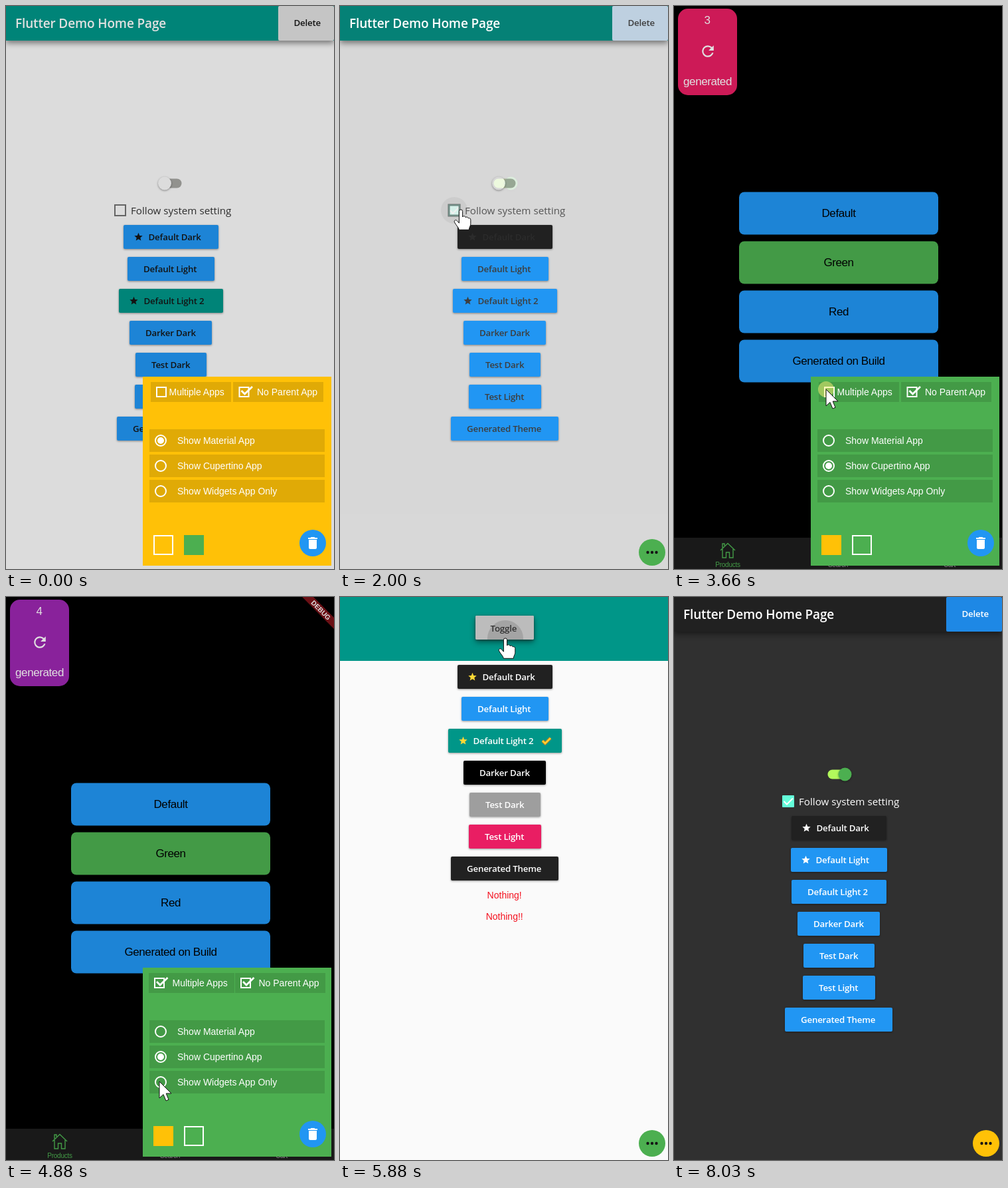
Animation, 494 px wide and 846 px high, one loop 8.89 s. Source, as an HTML page:

```html
<!DOCTYPE html>
<html lang="en">
<head>
<meta charset="utf-8">
<title>Theme demo</title>
<style>
  html, body { margin: 0; width: 100%; height: 100%; overflow: hidden; background: #303030; }
  svg { display: block; width: 494px; height: 846px; }
  text { font-family: "Liberation Sans", Arial, sans-serif; font-size: 14px; white-space: pre; }
  .ui { font-family: "Open Sans", "Noto Sans", sans-serif; font-size: 15.2px; }
  .btn { font-size: 13.3px; font-weight: 600; letter-spacing: -.2px; }
  .title { font-size: 19px; font-weight: 600; letter-spacing: -.14px; }
  .ios { font-size: 17px; letter-spacing: -.41px; }
  .tab { font-size: 10px; letter-spacing: -.24px; }
  .raised { filter: drop-shadow(0 1.5px 1.5px rgba(0,0,0,.4)); }
  .lifted { filter: drop-shadow(0 4px 4px rgba(0,0,0,.45)); }
</style>
</head>
<body>
<svg id="stage" viewBox="0 0 494 846"></svg>
<script>
const LOOP = 8890;
const TEAL = '#009688', BLUE = '#2196f3', GREEN = '#4caf50', INK = '#212121';
const AMBER = [255, 193, 7], LEAF = [76, 175, 80];

// markup helpers
const rect = (x, y, w, h, fill, more = '') =>
  `<rect x="${x}" y="${y}" width="${w}" height="${h}" fill="${fill}" ${more}/>`;
const disc = (x, y, r, fill, more = '') =>
  `<circle cx="${x}" cy="${y}" r="${r}" fill="${fill}" ${more}/>`;
const text = (x, y, s, fill, cls = '', more = '') =>
  `<text x="${x}" y="${y}" fill="${fill}" class="${cls}" ${more}>${s}</text>`;
const mid = (x, y, s, fill, cls) => text(x, y, s, fill, cls, 'text-anchor="middle"');
const line = (d, stroke, w) =>
  `<path d="${d}" fill="none" stroke="${stroke}" stroke-width="${w}"/>`;
const icon = (x, y, scale, d, fill) =>
  `<path transform="translate(${x} ${y}) scale(${scale}) translate(-12 -12)" d="${d}" fill="${fill}"/>`;
const group = (id, body) => `<g id="${id}">${body}</g>`;

const STAR = 'M12 17.27 18.18 21l-1.64-7.03L22 9.24l-7.19-.61L12 2 9.19 8.63 2 9.24l5.46 4.73L5.82 21z';
const TRASH = 'M6 19a2 2 0 0 0 2 2h8a2 2 0 0 0 2-2V7H6zM19 4h-3.5l-1-1h-5l-1 1H5v2h14z';
const REFRESH = 'M17.65 6.35A7.95 7.95 0 0 0 12 4a8 8 0 1 0 7.73 10h-2.08A6 6 0 1 1 12 6c1.66 0 3.14.69 4.22 1.78L13 11h7V4z';

// label, plain button width, own theme colour
const THEMES = [
  ['Default Dark', 129, INK], ['Default Light', 131, BLUE], ['Default Light 2', 143, TEAL],
  ['Darker Dark', 124, '#000'], ['Test Dark', 107, '#9e9e9e'],
  ['Test Light', 109, '#e91e63'], ['Generated Theme', 162, INK]
];

function themeButton(i, y, fill, ink, starred, ticked, gold) {
  const [label, base] = THEMES[i];
  const w = base + (starred ? 14 : 0) + (ticked ? 14 : 0);
  const x = Math.round(248.3 - w / 2);
  let out = rect(x, y, w, 36, fill, 'rx="2" class="raised"');
  if (starred) out += icon(x + 22.5, y + 18, .62, STAR, gold || ink);
  if (ticked) {
    const tick = `M${x + w - 29} ${y + 18}l4 4 8-8`;
    out += line(tick, '#d98a1c', 4.4) + line(tick, '#fdd835', 2);
  }
  return out + text(x + (starred ? 37.5 : 24), y + 23, label, ink, 'ui btn');
}

function materialPage({ dark, current, stars, pressed }) {
  const ink = dark ? '#fff' : '#161616';
  let out = rect(0, 0, 494, 846, dark ? '#303030' : '#fafafa');
  out += rect(0, 0, 494, 52, dark ? INK : TEAL, 'class="lifted"');
  out += text(14, 33, 'Flutter Demo Home Page', '#fff', 'ui title');
  out += rect(410, 0, 84, 52, dark ? '#1e88e5' : '#e0e0e0', 'rx="2"');
  out += text(433.5, 30, 'Delete', ink, 'ui btn');
  out += rect(231.5, 259.5, 33, 14, dark ? '#b2f95c' : '#a6a6a2', 'rx="7"');
  out += disc(dark ? 257.5 : 239, 266.5, 10, dark ? GREEN : '#fafafa', 'class="raised"');
  if (dark) {
    out += rect(163, 298, 18, 18, '#64ffda', 'rx="1"') + line('M165.5 307l4.5 4.5 9-9', '#fff', 2);
  } else {
    if (pressed) out += disc(172, 307, 20, 'rgba(0,0,0,.05)');
    out += rect(164, 299, 16, 16, 'none', `stroke="#737373" stroke-width="${pressed ? 3 : 2}"`);
  }
  out += text(188, 313, 'Follow system setting', dark ? '#fff' : '#333', 'ui');
  THEMES.forEach((th, i) => {
    const fill = i === current ? th[2] : BLUE;
    out += themeButton(i, 329 + 48 * i, fill, !dark && i === current && !i ? '#000' : ink, stars.includes(i));
  });
  return out;
}

function cupertinoPage(count, card, banner) {
  let out = rect(0, 0, 494, 846, '#000');
  out += rect(6, 4, 89, 130, card, 'rx="15"');
  out += mid(50, 27, count, '#fff', 'ios') + icon(51, 68, 1.1, REFRESH, '#fff');
  out += mid(50.5, 119, 'generated', '#fff', 'ios');
  ['Default', 'Green', 'Red', 'Generated on Build'].forEach((s, i) => {
    out += rect(98, 279.5 + 74 * i, 300, 64, i === 1 ? GREEN : BLUE, 'rx="8"');
    out += mid(248, 317 + 74 * i, s, '#000', 'ios');
  });
  out += rect(0, 799, 494, 47, '#1c1c1c');
  out += line('M70 818l11-10.5 11 10.5M73 816v13h5.5v-8h5v8H89v-13M73 814v-6h3v3', GREEN, 1.4);
  out += mid(81, 843, 'Products', GREEN, 'tab') + mid(247, 843, 'Search', '#999', 'tab') + mid(415, 843, 'Cart', '#999', 'tab');
  if (banner) {
    out += `<g transform="translate(474.3 19.7) rotate(45)">${rect(-40, -6, 80, 12, '#7a1218')}${
      text(0, 3.7, 'DEBUG', '#fff', '', 'text-anchor="middle" style="font-size:10.2px;font-weight:700"')}</g>`;
  }
  return out;
}

function widgetsPage(dark) {
  const current = dark ? 0 : 2;
  let out = rect(0, 0, 494, 846, dark ? '#303030' : '#fafafa');
  out += rect(0, 0, 494, 96, dark ? INK : TEAL);
  out += rect(204, 28, 88, 36, '#e0e0e0', 'rx="2" class="raised"');
  THEMES.forEach((th, i) => {
    out += themeButton(i, 102 + 48 * i, th[2], '#fff', i === 0 || i === 2, i === current, '#fdd835');
  });
  out += mid(247.7, 453, 'Nothing!', '#f4111f') + mid(247.7, 485, 'Nothing!!', '#f4111f');
  return out + text(226.5, 52, 'Toggle', '#333', 'ui btn');
}

function chip(x, w, boxX, textX, label, checked) {
  let out = rect(x, 565, w, 30, 'rgba(0,0,0,.12)');
  out += rect(boxX + 1, 573, 14, 14, 'none', 'stroke="#fff" stroke-width="2"');
  if (checked) out += line(`M${boxX + 4} 578l5 5 11.5-11`, '#fff', 2.8);
  return out + text(textX, 585, label, '#fff');
}

function panelBody() {
  let out = group('oneApp', chip(218, 121, 226, 245.5, 'Multiple Apps') + chip(342, 136, 350.5, 378, 'No Parent App', true));
  out += group('manyApps', chip(215, 129, 223, 250.5, 'Multiple Apps', true) + chip(345, 136, 353, 380.5, 'No Parent App', true));
  ['Material App', 'Cupertino App', 'Widgets App Only'].forEach((s, i) => {
    const y = 653 + 38 * i;
    out += rect(216, y - 17, 264, 34, 'rgba(0,0,0,.12)');
    out += disc(233, y, 8, 'none', 'stroke="#fff" stroke-width="2"');
    out += text(258, y + 5, 'Show ' + s, '#fff');
  });
  out += disc(233, 653, 5, '#fff', 'id="dot"');
  out += rect(222, 795, 30, 30, '#ffc107') + rect(268, 795, 30, 30, GREEN);
  out += rect(223, 796, 28, 28, 'none', 'id="pick" stroke="#fff" stroke-width="2"');
  return out + disc(462, 807, 20, BLUE) + icon(462, 807, 1, TRASH, '#fff');
}

function dialog() {
  return rect(0, 347, 494, 152, GREEN) + mid(247, 395, 'Delete saved data?', '#fff') +
    rect(168, 433, 60, 41, 'rgba(0,0,0,.12)', 'id="yes"') + mid(198, 458, 'Yes', '#fff') +
    rect(266, 433, 60, 41, 'rgba(0,0,0,.12)') + mid(296, 458, 'No', '#fff');
}

const PAGES = {
  light: materialPage({ current: 2, stars: [0, 2] }),
  press: materialPage({ current: 0, stars: [0, 2], pressed: true }),
  dark: materialPage({ dark: true, current: 0, stars: [0, 2] }),
  reset: materialPage({ dark: true, current: 0, stars: [0, 1] }),
  cupertino: cupertinoPage(3, '#e91e63', false),
  cupertinoMany: cupertinoPage(4, '#9c27b0', true),
  widgetsDark: widgetsPage(true),
  widgetsLight: widgetsPage(false)
};

const stage = document.getElementById('stage');
stage.innerHTML =
  '<clipPath id="toggleClip"><rect x="204" y="28" width="88" height="36" rx="2"/></clipPath>' +
  Object.entries(PAGES).map(([id, body]) => group(id, body)).join('') +
  group('pressedToggle', rect(204, 28, 88, 36, '#bcbcbc', 'rx="2" class="lifted"') +
    `<g clip-path="url(#toggleClip)">${disc(249, 62, 27, '#a4a4a4', 'id="ripple"')}</g>` +
    text(226.5, 52, 'Toggle', '#333', 'ui btn')) +
  rect(0, 0, 494, 846, '#000', 'id="dim"') +
  rect(206, 557, 284, 284, GREEN, 'id="panel"') +
  group('dots', [463.5, 470, 476.5].map(x => disc(x, 821, 2.2, '#151515')).join('')) +
  group('body', panelBody()) + group('dialog', dialog()) +
  group('cursor', disc(0, 0, 12, 'rgba(255,245,120,.5)', 'id="click"') +
    '<path id="arrow" d="M0 0V25L6 19.5 10 29 14 27.3 10.2 18H18Z" fill="#fff" stroke="#111"/>' +
    '<path id="hand" d="M-2.6 2.5a2.6 2.6 0 0 1 5.2 0V11c1-2 4-1.5 4.4.6 1.4-1.2 3.8-.5 4.2 1.3 1.8-.8 3.6.3 3.6 2.4v6c0 3-2 4.500-2.600 9H-2.600c-.8-4-4.500-6.500-7-11.500-1-2.500 1.800-4.200 3.800-2.200l3.200 3.600Z" fill="#fff" stroke="#111"/>');

const el = {};
stage.querySelectorAll('[id]').forEach(n => el[n.id] = n);

// step tables: [start ms, value...]
const PAGE = [[0, 'light'], [1930, 'press'], [2230, 'dark'], [3280, 'cupertino'], [3980, 'cupertinoMany'],
  [4960, 'widgetsDark'], [5800, 'widgetsLight'], [8030, 'reset']];
const FADE = [[0, 0], [2000, .17], [2080, .5], [2150, .85], [2230, 1]];
const DIM = [[0, .12], [1530, .06], [1610, 0], [2660, .12], [5650, .06], [5730, 0], [6740, .12], [8030, 0]];
// panel size and corner radius
const SHAPE = [[0, 284, 0], [1370, 284, 60], [1450, 284, 142], [1530, 40, 20], [2660, 284, 142], [2730, 284, 60],
  [2810, 284, 0], [5420, 284, 60], [5500, 284, 142], [5650, 40, 20], [6740, 284, 142], [6810, 284, 0], [8030, 40, 20]];
const TINT = [[0, 0], [840, .33], [950, .67], [1050, 1], [8030, 0]];
const RADIO = [[0, 0], [3280, 1], [4960, 2]];
const RIPPLE = [[0, 0], [5800, 15], [5880, 27], [5960, 45], [6040, 60], [6190, 0]];
// pointer kind, position, click ring
const POINTER = [[0, ''], [510, 'arrow', 285, 810], [610, 'arrow', 285, 810, 1], [840, 'arrow', 285, 810],
  [1370, 'arrow', 182, 230, 1], [1530, 'arrow', 182, 230], [1760, 'hand', 182, 306],
  [2310, 'arrow', 270, 450], [2400, 'arrow', 390, 680], [2490, 'arrow', 461, 811, 1], [2660, 'arrow', 461, 811],
  [2960, 'arrow', 235, 688, 1], [3110, 'arrow', 235, 688], [3580, 'arrow', 232, 640],
  [3660, 'arrow', 229, 576, 1], [3810, 'arrow', 229, 576], [4650, 'arrow', 230, 660],
  [4730, 'arrow', 231, 728, 1], [4880, 'arrow', 231, 728], [5190, 'arrow', 248, 748], [5270, 'arrow', 261, 762],
  [5420, 'arrow', 182, 40, 1], [5650, 'arrow', 182, 40], [5730, 'hand', 249, 62],
  [6190, 'arrow', 300, 220], [6270, 'arrow', 380, 480], [6350, 'arrow', 440, 720],
  [6420, 'arrow', 467, 832, 1], [6570, 'arrow', 467, 832], [6810, 'arrow', 459, 804],
  [6990, 'arrow', 459, 804, 1], [7340, 'arrow', 459, 804], [7650, 'arrow', 198, 453, 1],
  [7880, 'arrow', 198, 453], [8030, '']];

const at = (steps, t) => {
  let row = steps[0];
  for (const s of steps) if (s[0] <= t) row = s;
  return row.slice(1);
};
const show = (node, on) => { node.style.display = on ? '' : 'none'; };
const set = (node, attrs) => { for (const k in attrs) node.setAttribute(k, attrs[k]); };

function render(t) {
  const [page] = at(PAGE, t), [fade] = at(FADE, t);
  for (const id in PAGES) show(el[id], id === page || (id === 'dark' && page === 'press'));
  set(el.dark, { opacity: fade });

  const [ripple] = at(RIPPLE, t);
  show(el.pressedToggle, ripple > 0);
  set(el.ripple, { r: ripple });
  set(el.dim, { opacity: at(DIM, t)[0] });

  const [size, rx] = at(SHAPE, t), [tint] = at(TINT, t);
  const color = AMBER.map((c, i) => Math.round(c + (LEAF[i] - c) * tint));
  set(el.panel, { x: 490 - size, y: 841 - size, width: size, height: size, rx, fill: `rgb(${color})` });
  const open = size > 40;
  show(el.body, open);
  show(el.dots, !open);
  show(el.oneApp, t < 3980);
  show(el.manyApps, t >= 3980);
  set(el.dot, { cy: 653 + 38 * at(RADIO, t)[0] });
  set(el.pick, { x: tint ? 269 : 223, fill: `rgb(${color})` });

  show(el.dialog, t >= 7340 && t < 8030);
  set(el.yes, { fill: `rgba(0,0,0,${t >= 7880 ? .25 : .12})` });

  const [kind, x, y, ring] = at(POINTER, t);
  show(el.cursor, kind);
  if (kind) set(el.cursor, { transform: `translate(${x} ${y})` });
  show(el.arrow, kind === 'arrow');
  show(el.hand, kind === 'hand');
  show(el.click, ring);
}

const start = performance.now();
function tick() {
  render((performance.now() - start) % LOOP);
  requestAnimationFrame(tick);
}
tick();
</script>
</body>
</html>
```
